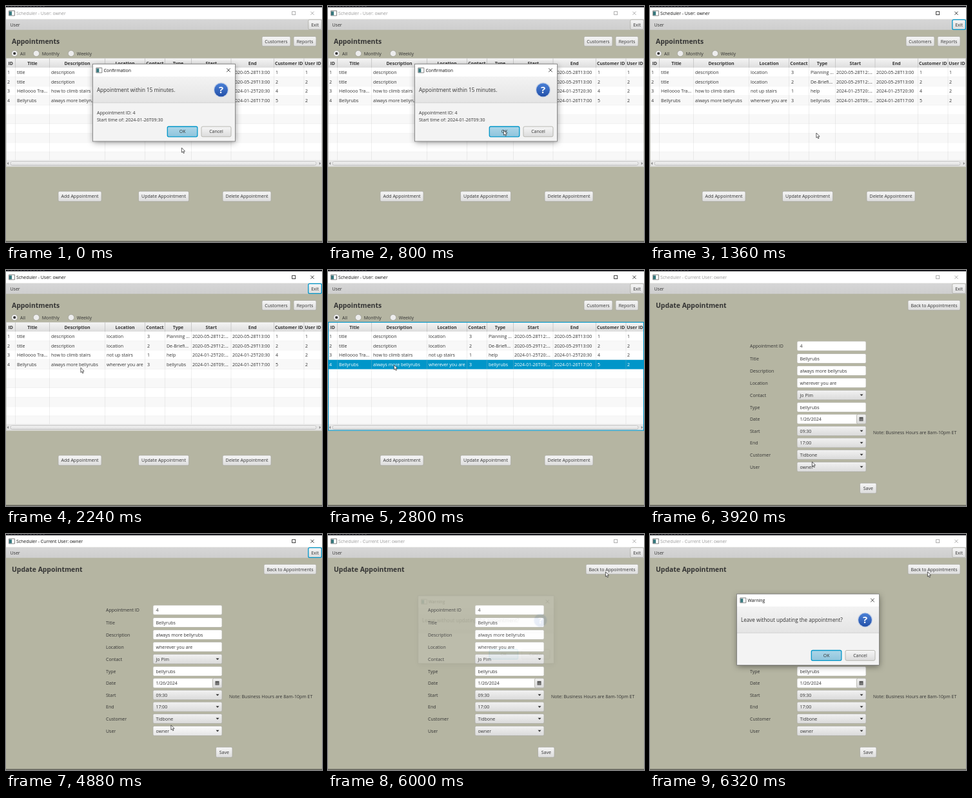
These frames come from a looping animation (490 by 368 pixels, 6.4 s). An HTML page with a canvas:

```html
<!DOCTYPE html>
<html lang="en">
<head>
<meta charset="utf-8">
<title>Scheduler</title>
<style>
  html, body { margin: 0; width: 100%; height: 100%; overflow: hidden; background: #b5b5a2; }
  canvas { display: block; width: 490px; height: 368px; }
</style>
</head>
<body>
<canvas id="stage"></canvas>
<script>
const W = 490, H = 368, LOOP = 6400, STEP = 80;
const FONT = '"Open Sans", "Noto Sans", sans-serif';
const BLUE = '#0096c9', INK = '#333', PAPER = '#b5b5a2';
const USER = 'owner';

const ratio = window.devicePixelRatio || 1;
const stage = document.getElementById('stage');
const layer = document.createElement('canvas');
for (const c of [stage, layer]) {
  c.width = W * ratio;
  c.height = H * ratio;
  c.getContext('2d').scale(ratio, ratio);
}
let ctx = stage.getContext('2d');

const COLUMNS = [
  // title, left edge, text start
  ['ID', 0, 2], ['Title', 14.5, 17], ['Description', 67.5, 70], ['Location', 153.5, 156],
  ['Contact', 215.5, 219], ['Type', 246.5, 249], ['Start', 287.5, 289],
  ['End', 349, 351], ['Customer ID', 415.5, 418], ['User ID', 462, 464]
];
const ROWS = [
  ['1', 'title', 'description', 'location', '3', 'Planning ...', '2020-05-28T12:...', '2020-05-28T13:00', '1', '1'],
  ['2', 'title', 'description', 'location', '2', 'De-Briefi...', '2020-05-29T12:...', '2020-05-29T13:00', '2', '2'],
  ['3', 'Helloooo Tra...', 'how to climb stairs', 'not up stairs', '1', 'help', '2024-01-25T20:...', '2024-01-25T20:30', '4', '2'],
  ['4', 'Bellyrubs', 'always more bellyrubs', 'wherever you are', '3', 'bellyrubs', '2024-01-26T09:...', '2024-01-26T17:00', '5', '2']
];
const FIELDS = [
  // label, value, centre, kind
  ['Appointment ID', '4', 118.5, 'text'], ['Title', 'Bellyrubs', 138, 'text'],
  ['Description', 'always more bellyrubs', 157, 'text'], ['Location', 'wherever you are', 176, 'text'],
  ['Contact', 'Jo Pim', 195, 'combo'], ['Type', 'bellyrubs', 214, 'text'],
  ['Date', '1/26/2024', 232.5, 'date'], ['Start', '09:30', 251, 'combo'],
  ['End', '17:00', 269.5, 'combo'], ['Customer', 'Tidbone', 288, 'combo'], ['User', USER, 307, 'combo']
];
const POINTER = [
  // time, x, y
  [0, 272, 221], [640, 272, 194], [800, 272, 194], [1360, 257.5, 198], [1520, 257.5, 198],
  [2400, 102, 148], [2880, 102, 148], [3280, 251, 299], [4560, 251, 299], [4640, 255.5, 298],
  [4880, 255.5, 298], [5520, 430, 59], [LOOP, 430, 59]
];
const CONFIRMATION = {
  title: 'Confirmation', message: 'Appointment within 15 minutes.', top: 90.5, height: 120.5,
  details: ['Appointment ID: 4', 'Start time of: 2024-01-26T09:30']
};
const WARNING = {
  title: 'Warning', message: 'Leave without updating the appointment?', top: 93.7, height: 110.8, details: []
};

const clamp = v => Math.max(0, Math.min(1, v));

function rect(x, y, w, h, fill) {
  ctx.fillStyle = fill;
  ctx.fillRect(x, y, w, h);
}

function text(s, x, centre, { size = 7, color = INK, bold = false, align = 'left' } = {}) {
  ctx.font = `${bold ? 'bold ' : ''}${size}px ${FONT}`;
  ctx.textAlign = align;
  ctx.fillStyle = color;
  ctx.fillText(s, x, centre + size * 0.36);
}

function shade(y, h, top, bottom) {
  const g = ctx.createLinearGradient(0, y, 0, y + h);
  g.addColorStop(0, top);
  g.addColorStop(1, bottom);
  return g;
}

function box(x, y, w, h, fill, border, radius = 2, line = 0.8) {
  ctx.beginPath();
  ctx.roundRect(x, y, w, h, radius);
  ctx.fillStyle = fill;
  ctx.fill();
  ctx.strokeStyle = border;
  ctx.lineWidth = line;
  ctx.stroke();
}

function outline(x, y, w, h, color, line = 0.8) {
  ctx.strokeStyle = color;
  ctx.lineWidth = line;
  ctx.strokeRect(x, y, w, h);
}

function disc(x, y, r, fill) {
  ctx.beginPath();
  ctx.arc(x, y, r, 0, Math.PI * 2);
  ctx.fillStyle = fill;
  ctx.fill();
}

function polygon(points, fill) {
  ctx.beginPath();
  points.forEach(([x, y]) => ctx.lineTo(x, y));
  ctx.closePath();
  ctx.fillStyle = fill;
  ctx.fill();
}

function button(label, x, y, w, h, { focused = false, primary = false } = {}) {
  const fill = primary ? shade(y, h, '#add6e8', '#8fc4dc') : shade(y, h, '#f6f6f6', '#dcdcdc');
  const lit = focused || primary;
  box(x, y, w, h, fill, lit ? BLUE : '#aaaaa2', 2, lit ? 1.3 : 0.8);
  text(label, x + w / 2, y + h / 2, { align: 'center' });
}

function appIcon(x, y) {
  box(x, y, 9, 7.5, '#fff', '#666', 0);
  rect(x + 0.5, y + 1, 4, 6, '#35767c');
}

function cross(x, y, r, color) {
  ctx.beginPath();
  ctx.moveTo(x - r, y - r);
  ctx.lineTo(x + r, y + r);
  ctx.moveTo(x + r, y - r);
  ctx.lineTo(x - r, y + r);
  ctx.strokeStyle = color;
  ctx.lineWidth = 0.8;
  ctx.stroke();
}

function windowFrame(title, active, exitFocused) {
  rect(0, 0, W, H, PAPER);
  rect(0, 0, W, 2.2, '#1a1a20');
  for (let x = 2; x < 62; x += 5) rect(x, 0, 3, 0.8, '#55555c');
  rect(0, 2.2, W, 18.6, '#fff');
  appIcon(4.5, 7.5);
  const color = active ? '#111' : '#999';
  text(title, 16, 11.5, { size: 6.9, color });
  outline(443.7, 8.7, 5, 5, color);
  cross(475, 11.3, 2.6, color);
  rect(0, 20.8, W, 16.4, shade(20.8, 16.4, '#d6d6d6', '#cecece'));
  text('User', 6.5, 29);
  button('Exit', 468.8, 21.3, 20.6, 15.4, { focused: exitFocused });
  rect(0, 366.4, W, 1.6, '#66665e');
}

function radio(label, x, selected) {
  disc(x, 74, 5, '#a6a69c');
  disc(x, 74, 4.3, '#ededed');
  if (selected) disc(x, 74, 2.1, '#333');
  text(label, x + 8.8, 74);
}

function table(selected, focused) {
  const top = 81.5, head = 96.2, rowH = 14.65, bottom = 240.5;
  rect(0, top, W, 169, '#fff');
  rect(0, top, W, head - top, shade(top, head - top, '#f5f5f5', '#dddddd'));
  for (let i = 0; head + i * rowH < bottom; i++) {
    const y = head + i * rowH, h = Math.min(rowH, bottom - y);
    const picked = selected && i === 3;
    rect(0, y, W, h, picked ? (focused ? BLUE : '#d3d3d3') : i % 2 ? '#f8f8f8' : '#fff');
    if (!picked) rect(0, y + h - 0.6, W, 0.6, '#ececec');
  }
  COLUMNS.forEach(([title, left, start], c) => {
    const right = c < COLUMNS.length - 1 ? COLUMNS[c + 1][1] : W;
    text(title, (left + right) / 2, 89, { bold: true, align: 'center' });
    if (c) {
      rect(left - 0.4, top, 0.8, head - top, '#c2c2c2');
      rect(left - 0.3, head, 0.6, bottom - head, 'rgba(190,190,190,.4)');
    }
    ROWS.forEach((row, r) => {
      const color = selected && focused && r === 3 ? '#fff' : INK;
      text(row[c], start, 103.4 + r * rowH, { color });
    });
  });
  rect(0, bottom, W, 9.8, '#e6e6e6');
  box(7, 242.6, 474, 5.8, shade(242, 6, '#f8f8f8', '#dedede'), '#b8b8b8', 2.5, 0.7);
  polygon([[1.6, 245.5], [4, 243.3], [4, 247.7]], '#888');
  polygon([[488.2, 245.5], [485.8, 243.3], [485.8, 247.7]], '#888');
  outline(0.5, top, W - 1, 168.6, focused ? BLUE : '#c0c0b8', focused ? 1.2 : 0.7);
}

function listPage(selected, focus) {
  text('Appointments', 9, 55, { size: 10.4, bold: true });
  button('Customers', 397, 47.5, 44, 15.3);
  button('Reports', 446, 47.5, 35, 15.3);
  radio('All', 13.2, true);
  radio('Monthly', 47, false);
  radio('Weekly', 101, false);
  table(selected, focus === 'table');
  button('Add Appointment', 81, 289, 67, 15.8);
  button('Update Appointment', 205.5, 289, 78, 15.8, { focused: focus === 'update' });
  button('Delete Appointment', 336, 289, 75, 15.8);
}

function field([label, value, centre, kind], hovered) {
  const x = 228, w = 107, y = centre - 7.5, h = 15;
  const grey = hovered ? shade(y, h, '#fbfbfb', '#e6e6e6') : shade(y, h, '#f2f2f2', '#dadada');
  text(label, 155, centre);
  if (kind === 'combo') {
    box(x, y, w, h, grey, '#adada4');
    polygon([[325.5, centre - 1.2], [330.5, centre - 1.2], [328, centre + 1.6]], '#333');
  } else {
    box(x, y, w, h, '#fff', '#b4b4aa');
  }
  if (kind === 'date') {
    box(320.5, y, 14.5, h, grey, '#adada4');
    rect(324.5, centre - 3, 6, 6, '#444');
    for (let i = 0; i < 6; i++) {
      rect(325.3 + (i % 3) * 1.7, centre - 0.9 + Math.floor(i / 3) * 1.9, 1, 1, '#ddd');
    }
  }
  text(value, 232.5, centre);
}

function formPage(focus, hoverUser) {
  text('Update Appointment', 9, 55, { size: 10.4, bold: true });
  button('Back to Appointments', 400, 47.3, 81, 15.5, { focused: focus === 'back' });
  FIELDS.forEach(f => field(f, hoverUser && f[0] === 'User'));
  text('Note: Business Hours are 8am-10pm ET', 346, 253.5);
  button('Save', 325.5, 332.3, 25.5, 16);
}

function dialogContent({ title, message, details, top, height }) {
  const x = 134.5, w = 221;
  ctx.save();
  ctx.shadowColor = 'rgba(0,0,0,.45)';
  ctx.shadowBlur = 9 * ratio;
  ctx.shadowOffsetY = 2 * ratio;
  rect(x, top, w, height, '#f3f3f3');
  ctx.restore();
  rect(x, top, w, 19.5, '#fff');
  appIcon(139.8, top + 6);
  text(title, 151.5, top + 10, { size: 6.9, color: '#111' });
  cross(345, top + 9.6, 2.8, '#222');
  rect(x, top + 19.5, w, 40.5, shade(top + 19.5, 40.5, '#f3f3f3', '#e4e4e4'));
  rect(x, top + 60, w, 0.8, '#c6c6c6');
  text(message, 141, top + 40.5, { size: 8.1 });
  disc(333.5, top + 40.3, 11.6, '#c9d3e6');
  disc(333.5, top + 40.3, 10.4, shade(top + 30, 21, '#4a80d6', '#2350a8'));
  text('?', 333.5, top + 40.3, { size: 15, bold: true, color: '#fff', align: 'center' });
  details.forEach((line, i) => text(line, 141, top + 76.3 + i * 10.7));
  button('OK', 250.3, top + height - 23, 46.5, 15.8, { primary: true });
  button('Cancel', 303, top + height - 23, 46, 15.8);
  outline(x, top, w, height, '#777');
}

// Paints the dialog on its own layer so that it fades and scales as one piece.
function dialog(spec, shown) {
  if (shown <= 0) return;
  const main = ctx, mid = spec.top + spec.height / 2, scale = 0.93 + 0.07 * shown;
  ctx = layer.getContext('2d');
  ctx.clearRect(0, 0, W, H);
  dialogContent(spec);
  ctx = main;
  ctx.save();
  ctx.globalAlpha = shown * shown;
  ctx.translate(W / 2, mid);
  ctx.scale(scale, scale);
  ctx.translate(-W / 2, -mid);
  ctx.drawImage(layer, 0, 0, W, H);
  ctx.restore();
}

function pointer(t) {
  const next = POINTER.findIndex(p => p[0] > t);
  const [t0, x0, y0] = POINTER[next - 1], [t1, x1, y1] = POINTER[next];
  const p = (t - t0) / (t1 - t0), e = p * p * (3 - 2 * p);
  ctx.save();
  ctx.translate(x0 + (x1 - x0) * e, y0 + (y1 - y0) * e);
  polygon([[0.4, 0], [0.4, 7.4], [2, 6], [3.2, 8.7], [4.5, 8.1], [3.3, 5.5], [5.5, 5.3]], '#fff');
  ctx.strokeStyle = '#222';
  ctx.lineWidth = 0.7;
  ctx.stroke();
  ctx.restore();
}

function focusAt(t) {
  if (t < 960) return 'dialog';
  if (t < 2480) return 'exit';
  if (t < 3360) return 'table';
  if (t < 3920) return 'update';
  if (t < 4320) return 'none';
  if (t < 5520) return 'exit';
  return t < 5840 ? 'back' : 'dialog';
}

function draw(t) {
  const focus = focusAt(t);
  const active = focus !== 'dialog' && focus !== 'none';
  windowFrame(`Scheduler - ${t < 3360 ? '' : 'Current '}User: ${USER}`, active, focus === 'exit');
  if (t < 3920) listPage(t >= 2480, focus);
  else formPage(focus, t >= 4640 && t < 4960);
  dialog(CONFIRMATION, 1 - clamp((t - 880) / 160));
  dialog(WARNING, clamp((t - 5920) / 240));
  pointer(t);
}

function tick(now) {
  draw(Math.floor((now % LOOP) / STEP) * STEP);
  requestAnimationFrame(tick);
}
draw(0);
requestAnimationFrame(tick);
</script>
</body>
</html>
```
